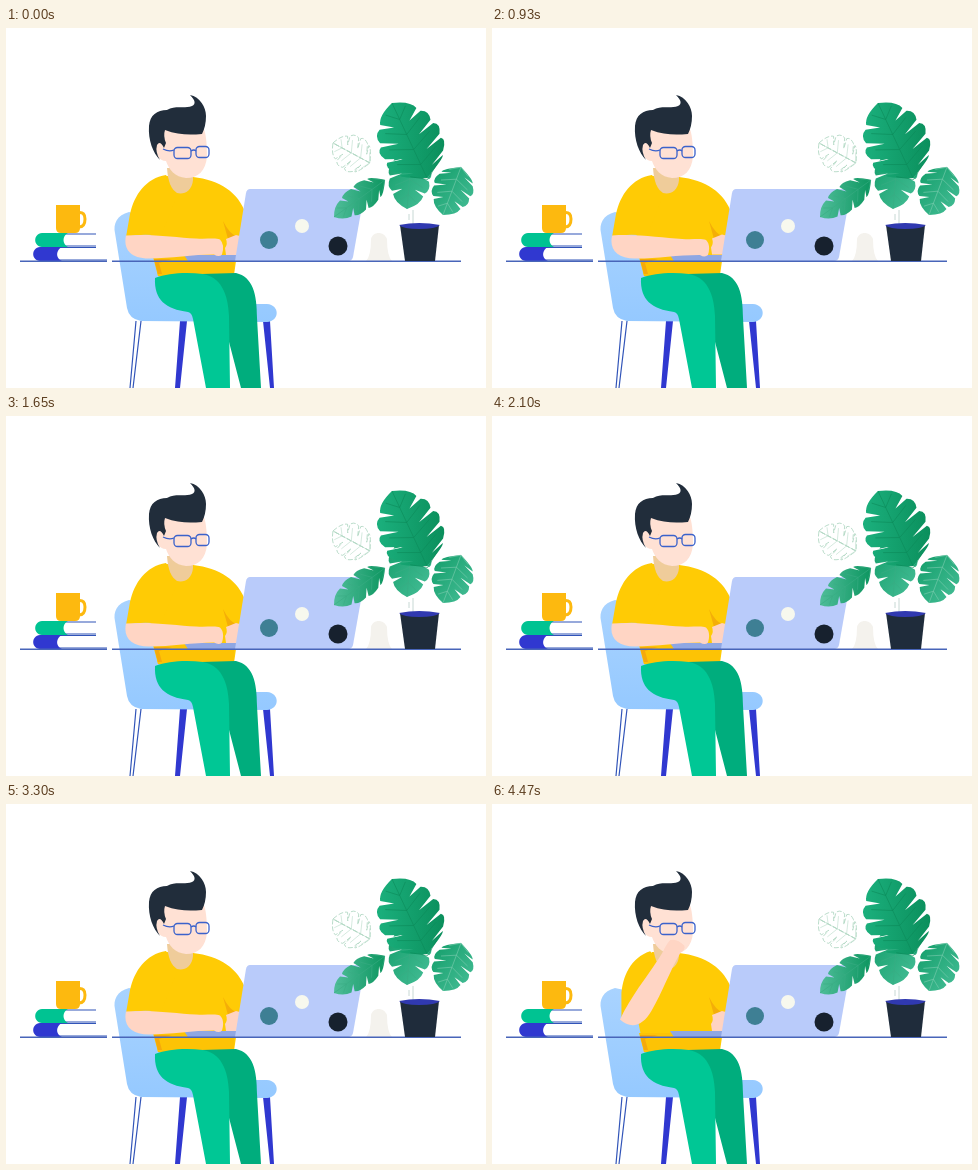
Animation of 480 by 360 pixels, one loop 4.5 s. Source, as an HTML page:

```html
<!DOCTYPE html>
<html lang="en">
<head>
<meta charset="utf-8">
<title>Working at a desk</title>
<style>
  html, body { margin: 0; width: 100%; height: 100%; overflow: hidden; background: #fff; }
  svg { display: block; width: 480px; height: 360px; }
</style>
</head>
<body>
<svg viewBox="0 0 480 360" fill="none">
  <defs>
    <linearGradient id="chairFill" x2="0" y2="1">
      <stop stop-color="#a9d3ff"/><stop offset="1" stop-color="#95c9ff"/>
    </linearGradient>
    <linearGradient id="deepFill">
      <stop stop-color="#1bb07d"/><stop offset="1" stop-color="#0b8f5c"/>
    </linearGradient>
    <linearGradient id="paleFill" y2="1">
      <stop stop-color="#129d69"/><stop offset="1" stop-color="#48bf98"/>
    </linearGradient>
    <linearGradient id="lowFill" x1="1" x2="0">
      <stop stop-color="#0d9660"/><stop offset="1" stop-color="#4fbd99"/>
    </linearGradient>
  </defs>

  <g id="chair">
    <path d="M130 293L124 360M135 293L127 360" stroke="#3154b8" stroke-width="1.2"/>
    <path d="M174 293H181L174 360H169ZM257 293H264L268 360H264Z" fill="#3038d0"/>
    <path d="M123 184C111 187 107 196 109 205L121 280Q123 291 135 293L261 294C274 293 274 277 261 276H215L150 235V190Z" fill="url(#chairFill)"/>
  </g>

  <g id="torso">
    <path d="M160 148L187 149C214 152 232 164 240 186L231 226L228 247Q188 251 152 248L146 216L140 180Z" fill="#ffcb05"/>
    <path id="sleeve" d="M160 147C140 150 128 167 124 186L120 209Q136 205 155 208L172 165Z" fill="#ffcb05"/>
    <path d="M147 229H228V247Q188 251 152 248Z" fill="#fdc305"/>
    <path d="M148 231H166L153 235L156 246H152Z" fill="#f5a90b"/>
    <path d="M217 193Q224 207 231 208L229 216L222 211Z" fill="#f4ae08"/>
    <path d="M161 140H187V152C186 163 178 167 171 165C165 161 162 154 161 140Z" fill="#efcc9a"/>
  </g>

  <g id="trousers">
    <path d="M195 246L230 245C247 249 251 266 251 290L255 360H235L222 310Z" fill="#00ad7d"/>
    <path d="M149 250C162 245 180 244 197 246C214 249 222 264 223 288L224 360H200L187 291Q186 285 182 284C160 281 148 272 149 250Z" fill="#00c795"/>
  </g>

  <g id="head">
    <path d="M158 101L197 99C200 104 201 116 201 128C200 143 192 150 180 150C169 149 163 142 160 133C153 133 149 126 150 117Z" fill="#ffe1d4"/>
    <path d="M154 132C147 125 142 112 143 98C144 87 151 82 161 82C169 77 178 81 186 78Q192 75 184 67C194 69 200 79 200 88Q200 98 196 106C183 107 172 107 159 102Q157 108 160 115L158 120Q154 112 151 117Q149 124 154 132Z" fill="#212d3b"/>
    <g stroke="#3b62cb" stroke-width="1.3">
      <path d="M157 121Q163 124 168 122M185 123Q188 121 190 123"/>
      <rect x="168" y="119.500" width="17" height="11" rx="3.500"/>
      <rect x="190" y="118.500" width="13" height="11" rx="3.500"/>
    </g>
  </g>

  <path id="farHand" d="M230 207L220 211Q222 216 219 220L220 227H232L234 208Z" fill="#ffd3c1"/>

  <g id="books">
    <path d="M58 206H90M58 218H90M52 219.500H90M52 232H101" stroke="#3154b8" stroke-width="1.200"/>
    <path d="M36 205H62C56 208 56 216 62 219H36C27 218 27 206 36 205Z" fill="#00c392"/>
    <path d="M34 219H56C50 222 49 230 56 233H34C25 232 25 220 34 219Z" fill="#3038d0"/>
    <path d="M73 184.500Q79 184 79 191Q79 199 73 199" stroke="#fdb90f" stroke-width="3"/>
    <path d="M50 177H74V200Q74 205 69 205H55Q50 205 50 200Z" fill="#fdb90f"/>
  </g>

  <path id="shadow" d="M360 233Q365 228 365 211C367 203 378 203 381 211Q381 228 386 233Z" fill="#f4f2ed"/>

  <g id="laptop">
    <path d="M178 227H231V233H182Z" fill="#8fa7e3"/>
    <path d="M244 161H354Q359 161 358 167L347 229Q346 233 342 233H229L240 165Q241 161 244 161Z" fill="#b9cbfa"/>
    <circle cx="263" cy="212" r="9" fill="#3e7f94"/>
    <circle cx="296" cy="198" r="7" fill="#f7f8ee"/>
    <circle cx="332" cy="218" r="9.500" fill="#17212e"/>
  </g>

  <path d="M14 233.300H101M106 233.300H455" stroke="#4865b9" stroke-width="1.400"/>

  <path d="M407 182V197M403 186V192" stroke="#b9cfca" stroke-width=".8"/>
  <path d="M394 197H433L429 233H399Z" fill="#1f2c3b"/>
  <path d="M393 197Q413 193 434 197Q430 201 413 201Q397 201 393 197Z" fill="#3039b0"/>
  <g id="leaves"></g>

  <!-- Forearm drawn from the elbow at the origin, pointing right -->
  <path id="arm" d="M-15 -11C10 -13 35 -9 55 -8C65 -7 74 -9 79 -7Q84 -2 81 8Q78 11 73 8C52 8 30 12 8 12C-10 12 -18 3 -15 -11Z" fill="#ffd5c4"/>
</svg>

<script>
const LOOP = 4500, RAISE_START = 3780, RAISE_END = 4380, TAP_PERIOD = 300;
const byId = id => document.getElementById(id);
const mix = (a, b, p) => a + (b - a) * p;
const start = performance.now();

// A blade split into lobes on both sides of its midrib, from tip to base.
function leaf(tip, base, halfWidth, lobes, paint, veinColor) {
  const dx = base[0] - tip[0], dy = base[1] - tip[1], length = Math.hypot(dx, dy);
  const width = u => halfWidth * Math.sqrt(Math.max(0, 4 * u ** 1.2 * (1 - u ** 1.2)));
  const at = (u, offset) => [
    tip[0] + dx * u - dy / length * offset,
    tip[1] + dy * u + dx / length * offset
  ].map(v => v.toFixed(1));

  let blade = "", veins = `M${tip}L${base}`;
  for (const side of [-1, 1]) {
    blade += `M${tip}`;
    for (let k = 0; k < lobes; k++) {
      const from = k / lobes, to = (k + 1) / lobes, mid = (from + to) / 2;
      const last = k === lobes - 1, end = last ? 1 : to - 0.02;
      blade += `Q${at(mid - 0.03, side * width(mid) * 1.2)} ${at(end, side * width(end))}`;
      if (!last) {
        const root = at(to + 0.08, side * width(to) * 0.4);
        blade += `L${root}L${at(to + 0.03, side * width(to + 0.03))}`;
      }
      veins += `M${at(mid + 0.12, 0)}L${at(mid, side * width(mid) * 0.75)}`;
    }
    blade += "Z";
  }
  byId("leaves").innerHTML +=
    `<path d="${blade}" ${paint}/><path d="${veins}" stroke="${veinColor}" stroke-width=".6"/>`;
}

leaf([327, 115], [364, 135], 17, 4, 'stroke="#a9d3bd" stroke-width=".8" stroke-dasharray="5 2"', "#b9dcca");
leaf([328, 189], [379, 152], 13, 4, 'fill="url(#lowFill)"', "#3aab83");
leaf([437, 187], [455, 139], 19, 4, 'fill="url(#paleFill)"', "#7fcdb0");
leaf([401, 181], [406, 121], 20, 4, 'fill="url(#paleFill)"', "#3aab83");
leaf([386, 75], [421, 150], 30, 5, 'fill="url(#deepFill)"', "#0c8a5a");

function easeInOut(u) {
  return u < 0.5 ? 4 * u ** 3 : 1 - 4 * (1 - u) ** 3;
}

function draw(now) {
  const t = Math.max(0, now - start) % LOOP;
  const u = Math.min(1, Math.max(0, (t - RAISE_START) / (RAISE_END - RAISE_START)));
  const raise = easeInOut(u);
  const tap = Math.sin(t / TAP_PERIOD * 2 * Math.PI) * (1 - raise);
  const elbow = [mix(135, 145, raise), mix(218.5, 208, raise)];

  byId("arm").setAttribute("transform", `translate(${elbow}) rotate(${mix(0, -60, raise) + tap * 0.7})`);
  byId("sleeve").setAttribute("transform", `rotate(${-10 * raise} 160 158)`);
  byId("farHand").setAttribute("transform", `translate(0 ${-tap})`);
  byId("shadow").style.visibility = u === 1 ? "hidden" : "visible";
  requestAnimationFrame(draw);
}
draw(start);
</script>
</body>
</html>
```
